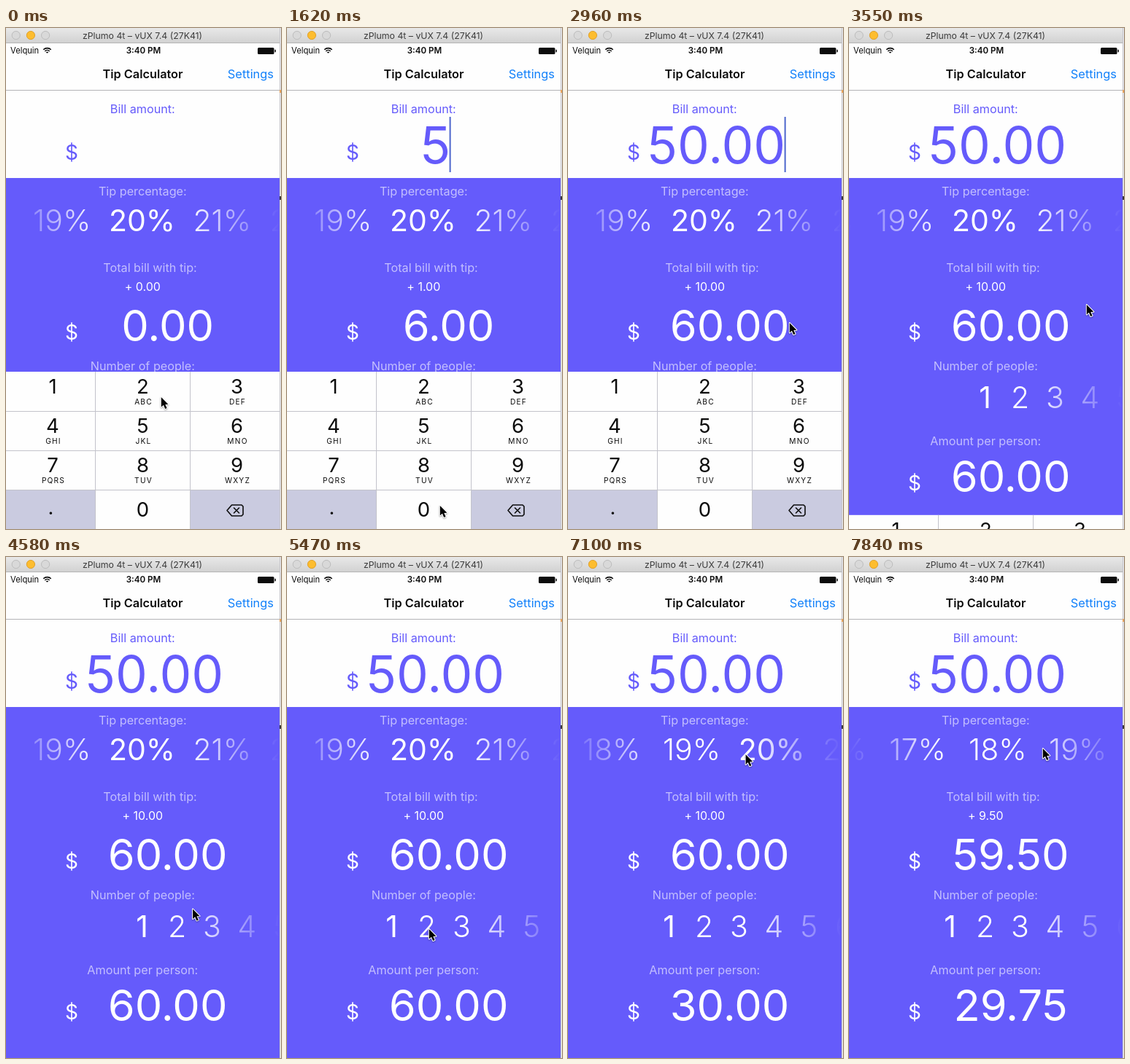
Write an HTML page with a canvas that moves like this. It is 377 px wide and 688 px high and loops after 7.99 s.

```html
<!DOCTYPE html>
<html lang="en">
<head>
<meta charset="utf-8">
<title>Tip Calculator</title>
<style>
html, body { margin: 0; width: 100%; height: 100%; overflow: hidden; background: #fff; }
canvas { display: block; width: 377px; height: 688px; }
</style>
</head>
<body>
<canvas id="stage"></canvas>
<script>
const W = 377, H = 688, SCREEN = 375, LOOP = 7990, STEPS = 54;
const PURPLE = '#655bfb', BLACK = '#0c0c0c', KEY_GREY = '#cacbe0', LINE = '#c3c3cb';
const canvas = document.getElementById('stage');
const dpr = window.devicePixelRatio || 1;
canvas.width = W * dpr;
canvas.height = H * dpr;
const ctx = canvas.getContext('2d');
ctx.scale(dpr, dpr);

// Progress from 0 to 1 over a span of steps, eased at both ends
function ease(n, start, span) {
  const k = Math.min(1, Math.max(0, (n - start) / span));
  return k * k * (3 - 2 * k);
}

// Places where the pointer stops or turns: step, x, y
const STOPS = [
  [1, 212, 506], [3, 230, 512], [5, 230, 512], [8, 205, 550], [11, 209, 655],
  [15, 68, 660], [17, 68, 660], [18, 190, 660], [20, 303, 404], [24, 325, 379],
  [26, 325, 379], [33, 238, 508], [37, 194, 510], [42, 192, 352], [45, 150, 272],
  [49, 260, 270], [51, 138, 272], [53, 265, 262]
];
const TYPED = '50.00', TAPS = [8, 12, 15, 18, 19];

function pointerAt(n) {
  let [, x, y] = STOPS[0];
  for (let i = 1; i < STOPS.length; i++) {
    const [from] = STOPS[i - 1], [to, px, py] = STOPS[i];
    const k = ease(n, from, to - from);
    x += (px - x) * k;
    y += (py - y) * k;
  }
  return [x, y];
}

// Everything on the screen follows from the step
function stateAt(n) {
  const count = TAPS.filter(tap => tap <= n).length;
  const bill = TYPED.slice(0, count);
  const amount = Number(bill);
  const tip = amount * (n < 49 ? 20 : 19) / 100;
  return {
    bill,
    tip: tip.toFixed(2),
    total: (amount + tip).toFixed(2),
    share: ((amount + tip) / (n < 39 ? 1 : 2)).toFixed(2),
    pressed: TAPS.includes(n) ? TYPED[count - 1] : '',
    caret: n >= 2 && n < 22,
    drop: 216 * ease(n, 22, 2.45),
    peopleShift: -48 * ease(n, 33, 5),
    tipShift: 110 * ease(n, 45, 4) + 127 * ease(n, 51, 2),
    pointer: pointerAt(n)
  };
}

function text(str, x, y, size, color, weight = 400, align = 'center', spacing = 0) {
  ctx.font = `${weight} ${size}px Inter, "Open Sans", sans-serif`;
  ctx.letterSpacing = spacing + 'px';
  ctx.textAlign = align;
  ctx.fillStyle = color;
  ctx.fillText(str, x, y);
}

function rect(x, y, w, h, color) {
  ctx.fillStyle = color;
  ctx.fillRect(x, y, w, h);
}

function path(points, close) {
  ctx.beginPath();
  points.forEach(([x, y]) => ctx.lineTo(x, y));
  if (close) ctx.closePath();
}

function gradient(x, y, colors) {
  const g = ctx.createLinearGradient(0, 0, x, y);
  colors.forEach((c, i) => g.addColorStop(i / (colors.length - 1), c));
  return g;
}

function titleBar() {
  rect(0, 0, SCREEN, 20, gradient(0, 20, ['#e8e8e8', '#d2d2d2']));
  rect(0, 20, SCREEN, 1, '#b4b4b4');
  for (let i = 0; i < 3; i++) {
    ctx.beginPath();
    ctx.arc(13.7 + i * 20.2, 10, 5.6, 0, 7);
    ctx.fillStyle = i === 1 ? '#fdbd2f' : '#d9d9d9';
    ctx.fill();
    ctx.strokeStyle = i === 1 ? '#e0a028' : '#bdbdbd';
    ctx.lineWidth = 1;
    ctx.stroke();
  }
  text('zPlumo 4t – vUX 7.4 (27K41)', 187, 15, 12.3, '#3c3c3c');
}

function statusBar() {
  text('Velquin', 6, 35, 11.2, BLACK, 400, 'left');
  text('3:40 PM', 188.5, 35, 11.6, BLACK, 600);
  ctx.strokeStyle = BLACK;
  ctx.lineWidth = 1.6;
  for (let r = 1.6; r < 9; r += 2.9) {
    ctx.beginPath();
    ctx.arc(56.5, 35, r, -Math.PI * .75, -Math.PI * .25);
    ctx.stroke();
  }
  ctx.fillStyle = BLACK;
  ctx.beginPath();
  ctx.roundRect(345, 27, 22.5, 9, 1.5);
  ctx.fill();
  rect(368.4, 29.8, 1.5, 3.4, BLACK);
}

function navBar() {
  text('Tip Calculator', 187.5, 69, 16.3, BLACK, 600);
  text('Settings', 367, 69, 16.4, '#1180fa', 400, 'right');
  rect(0, 85, SCREEN, 1, '#b3b3b6');
}

// A row that fades out over its outer thirds; one item stays highlighted
function picker(items, chosen, y, pitch, shift) {
  const clear = 'rgba(255,255,255,0)';
  const fade = gradient(SCREEN, 0, [clear, '#fff', '#fff', clear]);
  items.forEach((item, i) => {
    text(item, 186.5 + (i - chosen) * pitch + shift, y, 41, fade, i === chosen ? 400 : 300);
  });
}

function label(str, y, color, x = 187.3) {
  text(str, x, y, 16.2, color);
}

function money(str, x, y, size, color, signY) {
  text('$', 90, signY, 28, color);
  text(str, x, y, size, color);
}

function billField(s) {
  label('Bill amount:', 117, PURPLE);
  money(s.bill, 203.5, 185.5, 69.5, PURPLE, 181);
  const half = ctx.measureText(s.bill).width / 2;
  if (s.caret) rect(202 + half, 122, 2, 76, '#4c66cc');
}

function results(s) {
  const soft = 'rgba(255,255,255,.61)';
  const percents = Array.from({ length: 9 }, (_, i) => 16 + i + '%');
  rect(0, 206, SCREEN, H - 206, PURPLE);
  label('Tip percentage:', 230, soft);
  picker(percents, 4, 279, 109.8, s.tipShift);
  label('Total bill with tip:', 335, soft, 197.5);
  text('+ ' + s.tip, 187.3, 361, 16, '#fff');
  money(s.total, 221.6, 429.5, 59.5, '#fff', 428);
  label('Number of people:', 470, soft);
  picker([...'123456'], 0, 522, 48, s.peopleShift);
  label('Amount per person:', 573, soft);
  money(s.share, 221.6, 636.5, 59.5, '#fff', 635);
}

const KEYS = [...'123456789.0', 'del'];
const LETTERS = ['', 'ABC', 'DEF', 'GHI', 'JKL', 'MNO', 'PQRS', 'TUV', 'WXYZ'];
const COLS = [0, 123, 253, SCREEN], MIDS = [64, 187.5, 316.5];

function deleteIcon() {
  ctx.strokeStyle = BLACK;
  ctx.lineWidth = 1.6;
  ctx.lineJoin = ctx.lineCap = 'round';
  path([[303, 662.5], [309.5, 655], [323, 655], [325, 657], [325, 668], [323, 670], [309.5, 670]], true);
  ctx.stroke();
  for (const d of [-3.5, 3.5]) {
    path([[316 - d, 659], [316 + d, 666]]);
    ctx.stroke();
  }
}

function keypad({ drop, pressed }) {
  ctx.save();
  ctx.translate(0, drop);
  KEYS.forEach((key, i) => {
    const c = i % 3, top = 472 + Math.floor(i / 3) * 54;
    const grey = (key === '.' || key === 'del') !== (key === pressed);
    rect(COLS[c], top, COLS[c + 1] - COLS[c], 54, grey ? KEY_GREY : '#fefefe');
    if (key === 'del') deleteIcon();
    else if (key === '.') text(key, 61.5, 668, 27, BLACK);
    else text(key, MIDS[c], top + (key === '0' ? 37 : 30), 27.5, BLACK);
    if (LETTERS[i]) text(LETTERS[i], MIDS[c] + 1, top + 45, 10.2, BLACK, 400, 'center', 1.2);
  });
  for (let y = 526; y < H; y += 54) rect(0, y, SCREEN, 1, LINE);
  [122, 252].forEach(x => rect(x, 472, 1, 216, LINE));
  ctx.restore();
}

function desktopEdge() {
  rect(375, 0, 1, H, '#c6c6cc');
  rect(376, 0, 1, H, '#e9e9ec');
  rect(375, 85, 2, 4, '#e9a35c');
  rect(375, 231, 2, 5, '#33333d');
}

function pointer([x, y]) {
  ctx.save();
  ctx.translate(x, y);
  path([[.8, 1], [.8, 14.6], [3.9, 11.8], [6.2, 17], [8.6, 16], [6.3, 10.9], [10.4, 10.7]], true);
  ctx.lineJoin = 'round';
  ctx.lineWidth = 2;
  ctx.strokeStyle = '#fff';
  ctx.shadowColor = 'rgba(0,0,0,.35)';
  ctx.shadowBlur = 2;
  ctx.shadowOffsetY = 1;
  ctx.stroke();
  ctx.shadowColor = 'transparent';
  ctx.fillStyle = '#000';
  ctx.fill();
  ctx.restore();
}

function draw(t) {
  const n = Math.min(STEPS - 1, Math.floor(t / (LOOP / STEPS) + .1));
  const s = stateAt(n);
  rect(0, 0, W, H, '#fefefe');
  titleBar();
  statusBar();
  navBar();
  billField(s);
  results(s);
  keypad(s);
  desktopEdge();
  pointer(s.pointer);
}

const start = performance.now();
function tick() {
  draw((performance.now() - start) % LOOP);
  requestAnimationFrame(tick);
}
tick();
</script>
</body>
</html>
```
